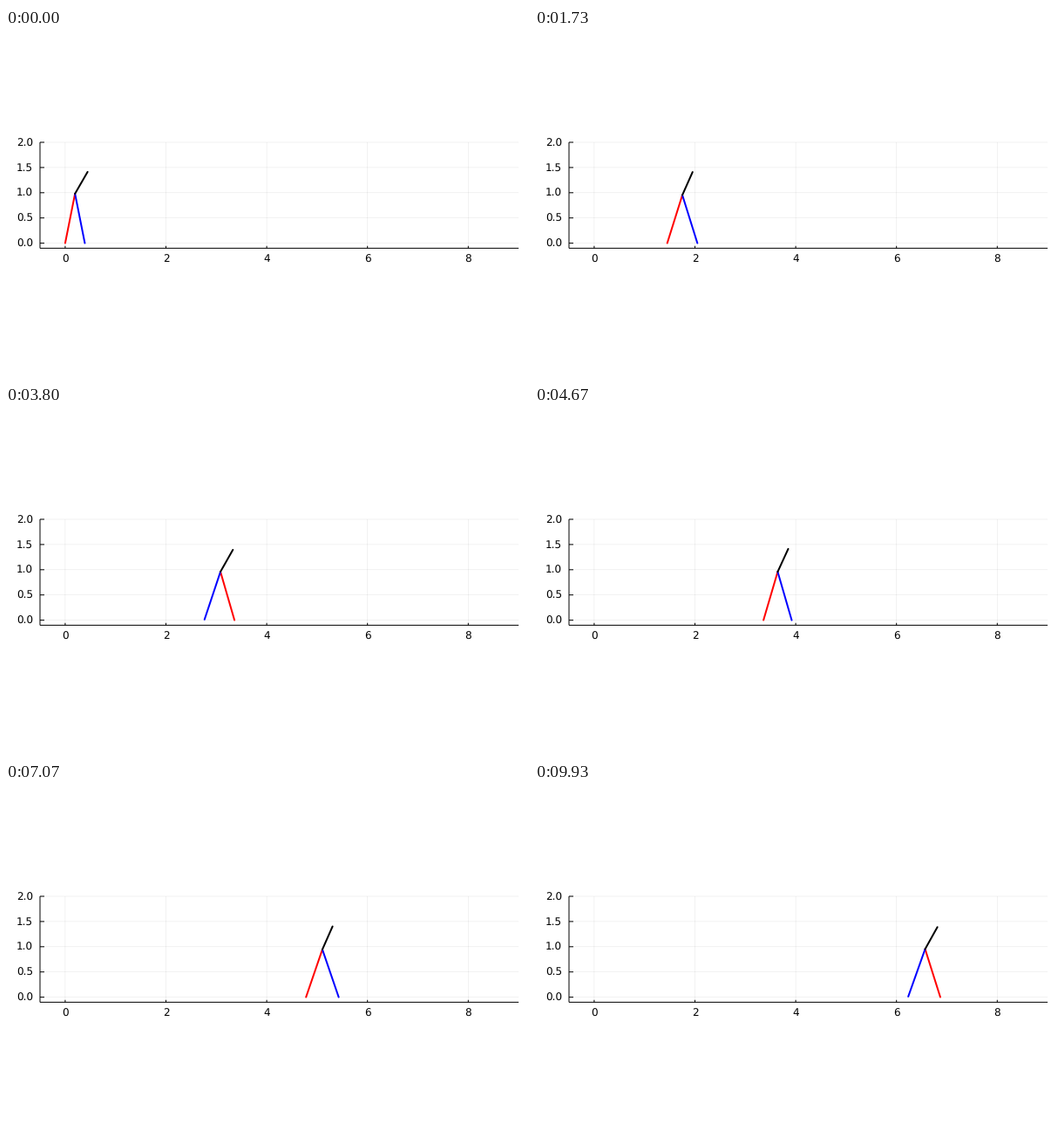
These frames come from a looping animation (600 by 400 pixels, 9.99 s). A matplotlib script:

```python
import numpy as np
import matplotlib.pyplot as plt
from matplotlib.animation import FuncAnimation

plt.rcParams.update({"path.snap": False, "text.hinting": "none"})

W, H, DPI = 600, 400, 100
PX = 72 / DPI          # one pixel in points
TICK, LOOP = 30, 9990  # ms
STEP = 200 / 3         # ms per pose, 15 poses a second
SCALE = 57.8
LEG, TORSO = 1.0, 0.5

# Footholds (m) and the pose numbers at which each becomes the stance foot
FEET = [-0.74, 0, 0.74, 1.45, 2.085, 2.67, 3.36, 4.07, 4.78, 5.455, 6.15, 6.87, 7.58]
STRIKES = [-9.4, 2.2, 14.0, 26.2, 41.7, 55.8, 70.85, 88.7, 106.15, 126.7, 147.7, 168.7]


def sx(x):
    return 67.9 + SCALE * np.asarray(x)


def sy(y):
    return 246.6 - SCALE * np.asarray(y)


def hermite(u, s0, s1):
    """Ease from 0 to 1 with the given end slopes."""
    return s0 * (u - 2*u**2 + u**3) + 3*u**2 - 2*u**3 + s1 * (u**3 - u**2)


def pose(n):
    """Stance foot, hip, swing foot and head of pose n."""
    k = int(np.searchsorted(STRIKES, n, side="right")) - 1
    u = (n - STRIKES[k]) / (STRIKES[k + 1] - STRIKES[k])
    back, foot, ahead = FEET[k:k + 3]
    start, end = (back + foot) / 2, (foot + ahead) / 2

    slow = min(k / 8, 1)
    hip_x = start + (end - start) * hermite(u, 1.1 + 0.35 * slow, 1.4 + 0.9 * slow)
    lean = np.arcsin((hip_x - foot) / LEG)
    hip_y = LEG * np.cos(lean)

    if k == 0:
        lag, tilt = 0, np.radians(30)
    else:
        lag = 0.07 * (1 - np.exp(-u / 0.08)) * (1 - u)
        tilt = np.radians(23.7 + 6.3 * (1 - np.exp(-u / 0.03)) * (1 - u**3))

    swing = lean - lag
    return ((foot, 0), (hip_x, hip_y),
            (hip_x + LEG * np.sin(swing), hip_y - LEG * np.cos(swing)),
            (hip_x + TORSO * np.sin(tilt), hip_y + TORSO * np.cos(tilt)))


fig = plt.figure(figsize=(W / DPI, H / DPI), dpi=DPI, facecolor="white")
ax = fig.add_axes([0, 0, 1, 1])
ax.set_xlim(0, W)
ax.set_ylim(H, 0)
ax.axis("off")

LEFT, RIGHT = sx(-0.5), sx(9)
TOP, BOTTOM = sy(2), sy(-0.1)


def rule(xs, ys, width=1, alpha=1):
    ax.plot(xs, ys, color="black", lw=width * PX, alpha=alpha,
            solid_capstyle="butt")


def grid(xs, ys):
    rule(xs, ys, width=0.5, alpha=0.1)


font = dict(family="DejaVu Sans", size=12 * PX, color="black")
for v in range(0, 10, 2):
    x = sx(v)
    grid([x, x], [TOP, BOTTOM])
    rule([x, x], [BOTTOM, BOTTOM - 2.6])
    ax.text(x, 268.4, str(v), ha="center", va="baseline", **font)
for v in np.arange(0, 2.1, 0.5):
    y = sy(v)
    grid([LEFT, RIGHT], [y, y])
    rule([LEFT, LEFT + 5], [y, y])
    ax.text(31, y + 4.4, f"{v:.1f}", ha="right", va="baseline", **font)
rule([LEFT, RIGHT], [BOTTOM, BOTTOM])
rule([LEFT, LEFT], [TOP, BOTTOM])

stance, swing, torso = (
    ax.plot([], [], color=c, lw=2 * PX, solid_capstyle="round")[0]
    for c in ("red", "blue", "black"))


def link(line, a, b):
    line.set_data(sx([a[0], b[0]]), sy([a[1], b[1]]))


def update(i):
    # latest pose due within this tick, pose times rounded to 10 ms
    n = int(((i + 1) * TICK - 5) / STEP)
    foot, hip, toe, head = pose(n)
    link(stance, foot, hip)
    link(swing, hip, toe)
    link(torso, hip, head)
    return stance, swing, torso


anim = FuncAnimation(fig, update, frames=LOOP // TICK, interval=TICK,
                     repeat=True, repeat_delay=0)
plt.show()
```
